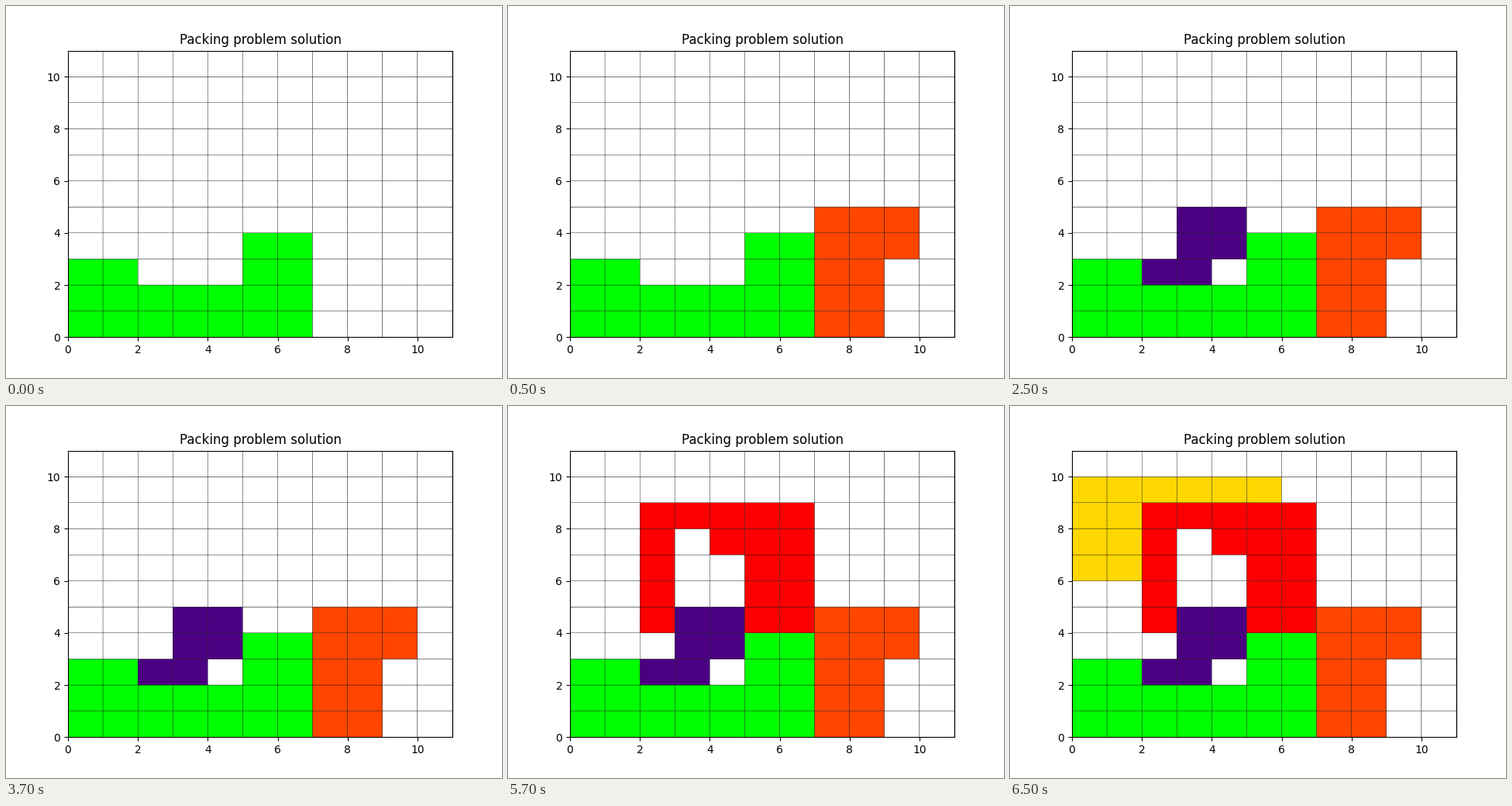
Animation, 640 px wide and 480 px high, one loop 8 s. Source, as a matplotlib script:

```python
import matplotlib.pyplot as plt
import numpy as np
from matplotlib.animation import FuncAnimation
from matplotlib.colors import ListedColormap

SIZE = 11
STEP_MS = 500
FRAMES = 16
STEPS_PER_PIECE = 4

y, x = np.mgrid[:SIZE, :SIZE]


def within(values, low, high):
    return (low <= values) & (values < high)


# Each piece is a rule for the cells it fills, in order of placement.
PIECES = {
    "lime": (x < 7) & (y < 2 + (x < 2) + 2 * (x >= 5)),
    "orangered": within(x, 7, 10) & (y < 5) & ((x < 9) | (y >= 3)),
    "indigo": (within(x, 3, 5) & within(y, 3, 5)) | (within(x, 2, 4) & (y == 2)),
    "red": within(x, 2, 7) & within(y, 4, 9)
           & ((x == 2) | (x >= 5) | (x + y >= SIZE)),
    "gold": (x < 6) & within(y, 6, 10) & ((x < 2) | (y == 9)),
}


def board_at(step):
    placed = 1 + (step + STEPS_PER_PIECE - 1) // STEPS_PER_PIECE
    board = np.zeros((SIZE, SIZE))
    for index, cells in enumerate(list(PIECES.values())[:placed], 1):
        board[cells] = index
    return board


fig, ax = plt.subplots(figsize=(6.4, 4.8), dpi=100)
ax.set_title("Packing problem solution")
mesh = ax.pcolor(board_at(0), cmap=ListedColormap(["white", *PIECES]),
                 vmin=0, vmax=len(PIECES), edgecolors="k", linewidths=0.25)
ax.set(xlim=(0, SIZE), ylim=(0, SIZE))


def update(step):
    mesh.set_array(board_at(step).ravel())
    return (mesh,)


anim = FuncAnimation(fig, update, frames=FRAMES, interval=STEP_MS,
                     repeat=True, repeat_delay=0)
plt.show()
```
